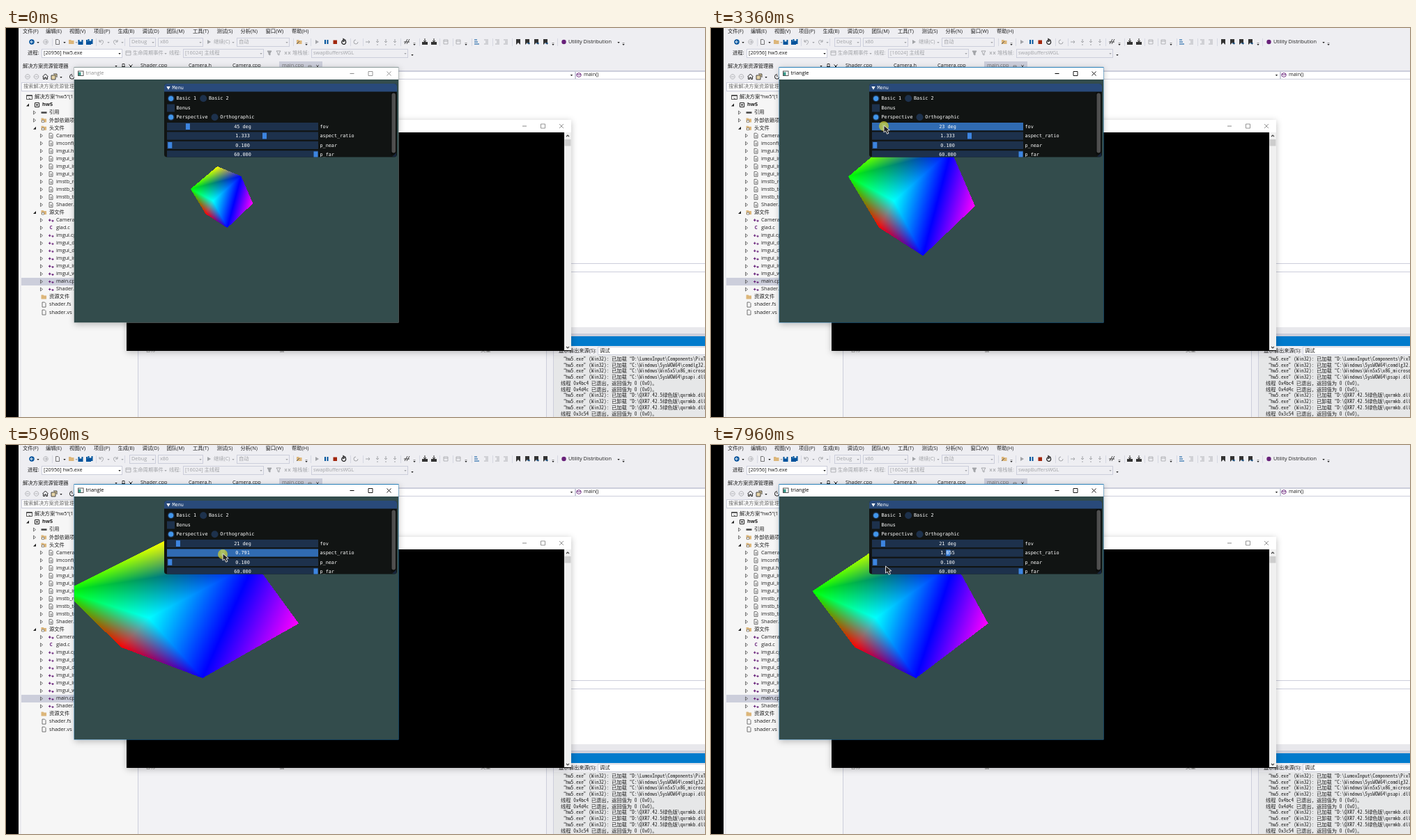
An HTML page with a canvas for the animation above (8000 ms loop, 1003x559 px).

```html
<!DOCTYPE html>
<html lang="zh">
<head>
<meta charset="utf-8">
<style>
html, body { margin: 0; width: 100%; height: 100%; overflow: hidden; background: #000 }
canvas { display: block }
</style>
</head>
<body>
<canvas id="stage" width="1003" height="559"></canvas>
<script>
const ctx = document.getElementById('stage').getContext('2d');
const UI = "'Open Sans','Noto Sans CJK SC',sans-serif";
const MONO = "'DejaVu Sans Mono',monospace";
const LOG = "'Noto Sans Mono CJK SC','Liberation Mono',monospace";
const INK = '#1e1e1e', DIM = '#a2a4a8', BLUE = '#00539c', LINE = '#cccedb', PANEL = '#eeeef2';

function rect(x, y, w, h, color) { ctx.fillStyle = color; ctx.fillRect(x, y, w, h); }
function box(x, y, w, h, fill, line = LINE) {
  rect(x, y, w, h, line);
  rect(x + 1, y + 1, w - 2, h - 2, fill);
}
function text(s, x, y, color = INK, font = '7.3px ' + UI, align = 'left') {
  ctx.font = font;
  ctx.textAlign = align;
  ctx.textBaseline = 'middle';
  ctx.fillStyle = color;
  ctx.fillText(s, x, y);
}
function path(d, x, y, line, fill, width = 1) {
  const p = new Path2D(d);
  ctx.save();
  ctx.translate(x, y);
  ctx.lineWidth = width;
  if (fill) { ctx.fillStyle = fill; ctx.fill(p); }
  if (line) { ctx.strokeStyle = line; ctx.stroke(p); }
  ctx.restore();
}
function disc(x, y, r, color) {
  ctx.fillStyle = color;
  ctx.beginPath();
  ctx.arc(x, y, r, 0, 7);
  ctx.fill();
}
function round(x, y, w, h, r, color) {
  ctx.fillStyle = color;
  ctx.beginPath();
  ctx.roundRect(x, y, w, h, r);
  ctx.fill();
}
const drop = (x, y, color = INK) => path('M-1.7 -1H1.7L0 1z', x, y, null, color);
const file = (x, y, color = '#555') => path('M-2.5 -3.5H1L2.5 -2V3.5H-2.5z', x, y, color, null, .8);
const folder = (x, y) => path('M-4 -3H-1L0 -2H3.5V3H-4z', x, y, null, '#dcb67a');
function combo(x, y, w, label, color = DIM, fill = PANEL) {
  box(x, y, w, 13, fill);
  text(label, x + 3, y + 6.5, color);
  drop(x + w - 4, y + 7, color);
}
function buttons(x, y, color) {
  path('M-3 0H3', x, y, color);
  path('M-3 -3H3V3H-3z', x + 26.5, y, color, null, .9);
  path('M-3 -3L3 3M3 -3L-3 3', x + 53, y, color, null, .9);
}

function toolbars() {
  const menus = [['文件(F)', 24], ['编辑(E)', 57], ['视图(V)', 91], ['项目(P)', 126], ['生成(B)', 160.5], ['调试(D)', 195.5],
    ['团队(M)', 230.5], ['工具(T)', 268], ['测试(S)', 302.5], ['分析(N)', 336.5], ['窗口(W)', 372.5], ['帮助(H)', 410]];
  for (const [s, x] of menus) text(s, x, 5);

  disc(37, 20, 3.7, BLUE);
  path('M2 0H-2M0 -2L-2 0L0 2', 37, 20, '#fff');
  drop(46, 21);
  path('M3.3 0A3.3 3.3 0 1 1 3.3 -.1M-2 0H2M0 -2L2 0L0 2', 57, 20, DIM, null, .8);
  file(74, 20); drop(84, 21);
  folder(94, 20); drop(101, 21, DIM);
  for (const x of [107, 118.5, 121]) {
    rect(x - 3.5, x > 120 ? 16 : 17, 7, 7, BLUE);
    rect(x - 1.5, x > 120 ? 16 : 17, 3, 2.5, PANEL);
  }
  for (const [x, d] of [[137, 'M-3 -3V0H0M-3 0C0 -5 6 -1 0 4'], [157, 'M3 -3V0H0M3 0C0 -5 -6 -1 0 4']]) {
    path(d, x, 20, DIM);
    drop(x + 10, 21, DIM);
  }
  combo(177, 14, 38, 'Debug');
  combo(218, 14, 65, 'x86');
  path('M-2 -3L3 0L-2 3z', 291, 20, null, DIM);
  text('继续(C)', 298, 20, DIM);
  drop(326, 21, DIM);
  combo(331, 14, 76, '自动');
  folder(421, 20);
  path('M-3 3L1 -1', 420, 20, '#555');
  path('M-2 -3L3 0L-2 3z', 446, 20, null, DIM);
  rect(457, 17, 2, 6, BLUE); rect(460.5, 17, 2, 6, BLUE);
  rect(469.5, 17.5, 5.5, 5.5, '#a1260d');
  path('M2 -2A3 3 0 1 1 -1 -3M-1 -5V-1L2 -3z', 485, 20.5, INK, null, 1.2);
  path('M3 0A3 3 0 1 1 0 -3', 502, 20, DIM);
  path('M-3 0H3M1 -2L3 0L1 2', 519, 20, DIM);
  for (const x of [533, 545, 558]) path('M0 -4V1M-2 -1L0 1L2 -1M-1 4H1', x, 20, DIM);
  path('M-3 3L1 -4M0 3L4 -4M-4 0H4', 575, 20, '#444');
  for (const x of [601, 614]) {
    rect(x - 4, 20, 8, 4, '#333');
    path('M0 -5V0M-2 -2L0 0L2 -2', x, 20, '#333');
  }
  for (const x of [631, 649]) path('M-3 -3H3V3H-3zM-3 -1H3', x, 20, DIM, null, .8);
  path('M-4 -3H0M-4 0H1M-4 3H3', 676, 20, BLUE);
  for (const x of [689, 705, 717]) path('M-3 -3H3M-1 -1H3M-1 1H3M-3 3H3', x, 20, DIM, null, .8);
  for (const x of [735, 748, 761, 774]) {
    path('M-3 -4H3V4L0 1L-3 4z', x, 20, null, '#333');
    if (x > 740) path('M0 2H4', x, 20, BLUE);
  }
  for (const x of [431, 586, 660, 785, 886]) {
    drop(x, 24);
    path('M-1.5 0H1.5', x, 21.5, '#777', null, .7);
  }
  for (const x of [66, 129, 170, 412, 437, 494, 512, 566, 593, 622, 641, 668, 698, 726, 791])
    rect(x, 15, .7, 11, LINE);
  disc(800.5, 20, 3.2, '#68217a');
  text('Utility Distribution', 807, 20);
  drop(879, 21);

  text('进程:', 31, 36);
  combo(51, 30, 116, '[20956] hw5.exe', INK, '#fff');
  path('M-3.5 -3H3.5V3H-3.5zM-3.5 -1H3.5', 175.5, 36, DIM, null, .8);
  text('生命周期事件', 182, 36, DIM);
  drop(229, 37, DIM);
  text('线程:', 234, 36, DIM);
  combo(254, 30, 116, '[16024] 主线程');
  path('M-3 -3H3L1 0V3L-1 2V0z', 378, 36, DIM, DIM);
  path('M-3 -3H3L1 0V3L-1 2V0z', 391, 36, DIM);
  path('M-4 -2L-1 2M-1 -2L-4 2M1 -2L4 2M4 -2L1 2', 404, 36, DIM);
  text('堆栈帧:', 411, 36, DIM);
  combo(438, 30, 139, 'swapBuffersWGL');
  drop(583, 39);
}

function solution() {
  rect(22, 49, 167, 13, PANEL);
  text('解决方案资源管理器', 24, 55);
  drop(158, 55);
  path('M-1 -3H2V1H-1zM-2 1H3M.5 1V4', 168, 54.5, INK, null, .8);
  path('M-2.5 -2.5L2.5 2.5M2.5 -2.5L-2.5 2.5', 179, 55, INK);
  for (const x of [31, 43.5]) path('M3.3 0A3.3 3.3 0 1 1 3.3 -.1M-2 0H2', x, 70, DIM, null, .8);
  path('M-4 0L0 -4L4 0M-3 0V3.5H-1V1H1V3.5H3V0', 56.5, 70, INK);
  path('M-4 -2H2V4H-4zM-1 -4H4V1', 69, 70, INK, '#e6d4a8', .8);
  drop(79, 71);
  path('M3 0A3.3 3.3 0 1 1 0 -3.3M0 0V-2', 95, 70, INK);
  box(22, 78, 167, 13, '#fff');
  text('搜索解决方案资源管理器', 25, 84.5, '#666');
  rect(22, 92, 167, 467, '#f6f6f6');
  rect(189, 424, 1, 135, LINE);

  const rows = ['0s解决方案"hw5"(1 个项目)', '1phw5', '2r引用', '2l外部依赖项', '2d头文件',
    ...'Camera.h imconfig.h imgui.h imgui_impl.h imgui_internal.h imgui_imx.h imstb_rectpack.h imstb_textedit.h imstb_truetype.h Shader.h'
      .split(' ').map(s => '3h' + s), '2d源文件',
    ...'Camera.cpp glad.c imgui.cpp imgui_demo.cpp imgui_draw.cpp imgui_impl.cpp imgui_impl_gl.cpp imgui_widgets.cpp main.cpp Shader.cpp'
      .split(' ').map(s => '3c' + s), '2e资源文件', '2fshader.fs', '2fshader.vs'];
  rows.forEach((row, i) => {
    const depth = +row[0], kind = row[1], name = row.slice(2);
    const y = 99.5 + i * 11.04, x = [41, 52, 62, 72][depth];
    if (name == 'main.cpp') rect(22, y - 5.5, 167, 11, LINE);
    if ('pd'.includes(kind)) path('M2 -2V2H-2z', x - 21, y, null, INK);
    else if ('rlhc'.includes(kind)) path('M-1.5 -2.5L1.5 0L-1.5 2.5z', x - 21, y, '#555', null, .8);
    const ix = x - 7.5;
    if (kind == 's') path('M-4 -3H4V3H-4zM-4 -2H4M-1 1L2 3', ix, y, '#444', null, .9);
    if (kind == 'p') path('M-3 -3H3V3H-3zM0 -1.5V1.5M-1.5 0H1.5', ix, y, INK);
    if (kind == 'r') path('M-4 0H4', ix, y, '#444', null, 2.5);
    if ('lde'.includes(kind)) folder(ix, y);
    if (kind == 'l' || kind == 'd') path('M-3 3H0V0H-3z', ix, y, '#666', '#fff', .7);
    if (kind == 'f') file(ix, y);
    if (kind == 'h') {
      file(ix, y);
      path('M-1 0H1.5M-1 1.5H1.5', ix, y, '#555', null, .7);
    }
    if (kind == 'c') {
      if (name == 'glad.c') text('C', ix - 2, y, '#68217a', 'bold 6.5px ' + UI);
      else path('M-3.5 0H0M-1.8 -1.8V1.8M1 1H4M2.5 -.5V2.5', ix, y, '#68217a', null, 1.1);
    }
    text(name, x, y, INK, (kind == 'p' ? 'bold ' : '') + '7.3px ' + UI);
  });
}

function editor() {
  rect(392, 48, 62, 13, LINE);
  [['Shader.cpp', 193], ['Camera.h', 262], ['Camera.cpp', 325]].forEach(([s, x]) => text(s, x, 54.5));
  text('main.cpp', 396, 54.5, '#717171');
  path('M-2 -1H2V1H-2z', 436, 55, '#777', null, .8);
  path('M-2 -2L2 2M2 -2L-2 2', 447, 55, '#555', null, .9);
  rect(190, 61, 813, 2, LINE);
  box(190, 62, 627, 12, '#fff');
  box(817, 62, 190, 12, '#fff');
  drop(811.5, 68);
  path('M0 -3L3 -1.5V1.5L0 3L-3 1.5V-1.5zM-3 -1.5L0 0L3 -1.5', 822, 67.5, '#68217a', null, .9);
  text('main()', 829, 67.5);
  rect(190, 74, 813, 356, '#fff');
  rect(811, 338, 192, 1, LINE);
  rect(811, 350, 192, 1, LINE);
  rect(811, 430, 192, 9, '#e8e8ec');
  rect(811, 439, 192, 4, LINE);
}

function output() {
  rect(190, 457, 585, 102, '#f2f2f5');
  rect(775, 457, 1, 102, LINE);
  text('名称', 200, 463, '#777');
  text('值', 392, 463, '#777');
  text('类型', 681, 463, '#777');
  rect(785, 443, 218, 14, '#007acc');
  rect(785, 470, 218, 89, '#e6e7e8');
  rect(785, 457, 1, 102, LINE);
  text('显示输出来源(S):', 793, 464);
  box(849, 458, 160, 12, '#fff');
  text('调试', 852, 464);
  const load = (p, verb = '加') => `“hw5.exe”(Win32): 已${verb}载“${p}`;
  const quit = id => `线程 ${id} 已退出，返回值为 0 (0x0)。`;
  const dll = 'D:\\QXR7.42.5绿色版\\qxrmkb.dll”';
  [load('D:\\LumoxInput\\Components\\PixTile'), load('C:\\Windows\\SysWOW64\\comdlg32.dll”'),
    load('C:\\Windows\\WinSxS\\x86_microsoft.windows'), load('C:\\Windows\\SysWOW64\\psapi.dll”'),
    quit('0x4bc4'), quit('0x4d4c'), load(dll), load(dll, '卸'), load(dll), quit('0x3c54')]
    .forEach((s, i) => text(s, 796, 475 + i * 8.78, INK, '7.3px ' + LOG));
}

function shadowed(x, y, w, h, color) {
  ctx.save();
  ctx.shadowColor = 'rgba(0,0,0,.25)';
  ctx.shadowBlur = 9;
  ctx.shadowOffsetY = 2;
  rect(x, y, w, h, color);
  ctx.restore();
}

function terminal() {
  shadowed(173, 132, 638, 332, '#000');
  rect(173, 132, 638, 18, '#fff');
  rect(801, 150, 10, 313, '#f0f0f0');
  rect(801.5, 160, 9, 9.5, '#cdcdcd');
  path('M-2 1L0 -1L2 1', 806, 155, '#444', null, 1.2);
  path('M-2 -1L0 1L2 -1', 806, 459, '#444', null, 1.2);
  buttons(744, 141, '#888');
}

// Cube corners projected at 21° and aspect 1.324, with their colours.
const corners = [[-147.5, -38.5, 0, 255, 0], [-61, -111, 255, 255, 0], [15.5, -79.5, 0, 0, 255], [53.5, 8, 255, 0, 255],
  [-29, 86.5, 0, 0, 255], [-99, 42, 255, 0, 0], [-75, 0, 0, 255, 255]];
const faces = ['012', '026', '624', '234', '065', '645'];
const view = ctx.createImageData(465, 349);
const pixels = new Uint32Array(view.data.buffer);

function cube(fov, aspect) {
  const W = view.width, H = view.height, rad = Math.PI / 360;
  const zoom = Math.tan(21 * rad) / Math.tan(fov * rad);
  const pts = corners.map(([x, y, ...rgb]) => [232.5 + x * zoom * 1.324 / aspect, 174.5 + y * zoom, rgb]);
  pixels.fill(0xff4c4c33);
  for (const face of faces) {
    const [a, b, c] = [...face].map(i => pts[i]);
    const xs = [a[0], b[0], c[0]], ys = [a[1], b[1], c[1]];
    const det = (b[1] - c[1]) * (a[0] - c[0]) + (c[0] - b[0]) * (a[1] - c[1]);
    const x1 = Math.min(W, Math.max(...xs)), y1 = Math.min(H, Math.max(...ys));
    for (let y = Math.max(0, Math.floor(Math.min(...ys))); y < y1; y++)
      for (let x = Math.max(0, Math.floor(Math.min(...xs))); x < x1; x++) {
        const dx = x + .5 - c[0], dy = y + .5 - c[1];
        const u = ((b[1] - c[1]) * dx + (c[0] - b[0]) * dy) / det;
        const v = ((c[1] - a[1]) * dx + (a[0] - c[0]) * dy) / det;
        const w = 1 - u - v;
        if (u < 0 || v < 0 || w < 0) continue;
        const mix = i => a[2][i] * u + b[2][i] * v + c[2][i] * w;
        pixels[y * W + x] = 0xff000000 | mix(2) << 16 | mix(1) << 8 | mix(0);
      }
  }
  ctx.putImageData(view, 98, 74);
}

function radio(label, x, y, on) {
  disc(x, y, 5, '#1d314c');
  if (on) disc(x, y, 3.6, '#4296ea');
  text(label, x + 7.8, y + .3, '#fff', '6.8px ' + MONO);
}

function panel(s) {
  const font = '6.8px ' + MONO;
  round(227, 80, 334, 105.5, 4, '#111413');
  round(227, 80, 334, 11.5, [4, 4, 0, 0], '#294a7a');
  path('M-2.7 -2H2.7L0 2.7z', 233, 86, null, '#fff');
  text('Menu', 238.5, 86.3, '#fff', font);
  rect(552.5, 92, 8, 90, '#0b0d0c');
  round(553.5, 93.5, 5.5, 86, 2.7, '#4f4f4f');
  path('M0 0V-6L-6 0z', 560, 185, null, '#16243a');
  radio('Basic 1', 236.7, 101.3, true);
  radio('Basic 2', 283.2, 101.3);
  rect(231, 109.5, 11, 11, '#1d314c');
  text('Bonus', 244.5, 115.2, '#fff', font);
  radio('Perspective', 236.7, 128.2, true);
  radio('Orthographic', 299.5, 128.2);

  ctx.save();
  ctx.beginPath();
  ctx.rect(227, 92, 334, 93.5);
  ctx.clip();
  [['fov', s.fov + ' deg', 234.7 + s.fov * .5833], ['aspect_ratio', s.aspect.toFixed(3), 370 + (s.aspect - 1.324) * 110.6],
    ['p_near', '0.100', 235.3], ['p_far', '60.000', 444.5]].forEach(([label, value, grab], i) => {
    const y = 136 + i * 13.4;
    const over = s.focus && s.x > 231 && s.x < 448 && s.y > y && s.y < y + 11.2;
    const held = s.drag == i + 1;
    rect(231, y, 217, 11.2, held ? '#306bb2' : over && !s.drag ? '#25508a' : '#1d314c');
    rect(grab - 3, y + 1.2, 6, 8.8, held ? '#4296fa' : '#3d85e0');
    text(value, 339.5, y + 6, '#fff', font, 'center');
    text(label, 450.5, y + 6, '#fff', font);
  });
  ctx.restore();
}

function demo(s) {
  shadowed(97.5, 56, 466, 367.5, s.focus ? '#2a80b8' : '#8b9a9a');
  rect(98, 57, 465, 17, '#fff');
  box(103, 61.5, 8.5, 7.5, '#fff', '#555');
  rect(104, 63.5, 3.5, 4.5, '#3a9a8c');
  const ink = s.focus ? '#000' : '#8c8c8c';
  text('triangle', 114.5, 65.5, ink);
  buttons(496.5, 65.5, ink);
  cube(s.fov, s.aspect);
  panel(s);
}

function pointer({x, y, drag}) {
  if (drag) disc(x, y, 7, 'rgba(205,205,50,.75)');
  path('M0 0V10L2.5 8L4.7 12.3L7 11.2L5 7.2L8.3 6.8z', x, y - 1, '#ddd', '#222', 1);
}

// Pointer path: ms, x, y.
const track = [[520, 910, 541], [1280, 236, 139], [1440, 236, 139], [1520, 248, 139], [1680, 249, 139], [1840, 261, 140],
  [2080, 261, 140], [2240, 257, 140], [2440, 248, 141], [2720, 248, 141], [2760, 247, 141], [3320, 247, 141],
  [3360, 248, 141], [3440, 248, 141], [3480, 247, 141], [3720, 247, 141], [4160, 371, 157], [4760, 371, 157],
  [4800, 370, 157], [5560, 300, 157], [5640, 298.6, 157], [5840, 298.6, 157], [5960, 311, 157], [6640, 395.77, 157],
  [6800, 425, 157], [7000, 425, 157], [7040, 428, 157], [7160, 428, 157], [7640, 340.25, 157], [7720, 340.25, 157],
  [7960, 250.5, 175]];

function stateAt(ms) {
  const next = track.findIndex(k => k[0] > ms);
  const b = track.at(next), a = next > 0 ? track[next - 1] : b;
  const f = a == b ? 0 : (ms - a[0]) / (b[0] - a[0]);
  const x = a[1] + (b[1] - a[1]) * f, y = a[2] + (b[2] - a[2]) * f;
  const drag = ms >= 2080 && ms < 3560 ? 1 : ms >= 4320 && ms < 7720 ? 2 : 0;
  return {
    x, y, drag,
    shown: ms >= 520,
    focus: ms >= 2080,
    fov: drag == 1 ? Math.round((x - 234.7) / .5833) : ms < 2080 ? 45 : 21,
    aspect: drag == 2 ? 1.324 + (x - 370) / 110.6 : ms < 4320 ? 1.333 : 1.055
  };
}

function draw() {
  const s = stateAt(Math.floor(performance.now() % 8000 / 40) * 40);
  rect(0, 0, 1003, 559, '#000');
  rect(18, 0, 985, 559, PANEL);
  toolbars();
  solution();
  editor();
  output();
  terminal();
  demo(s);
  rect(0, 0, 18, 559, '#000');
  if (s.shown) pointer(s);
  requestAnimationFrame(draw);
}
draw();
</script>
</body>
</html>
```
